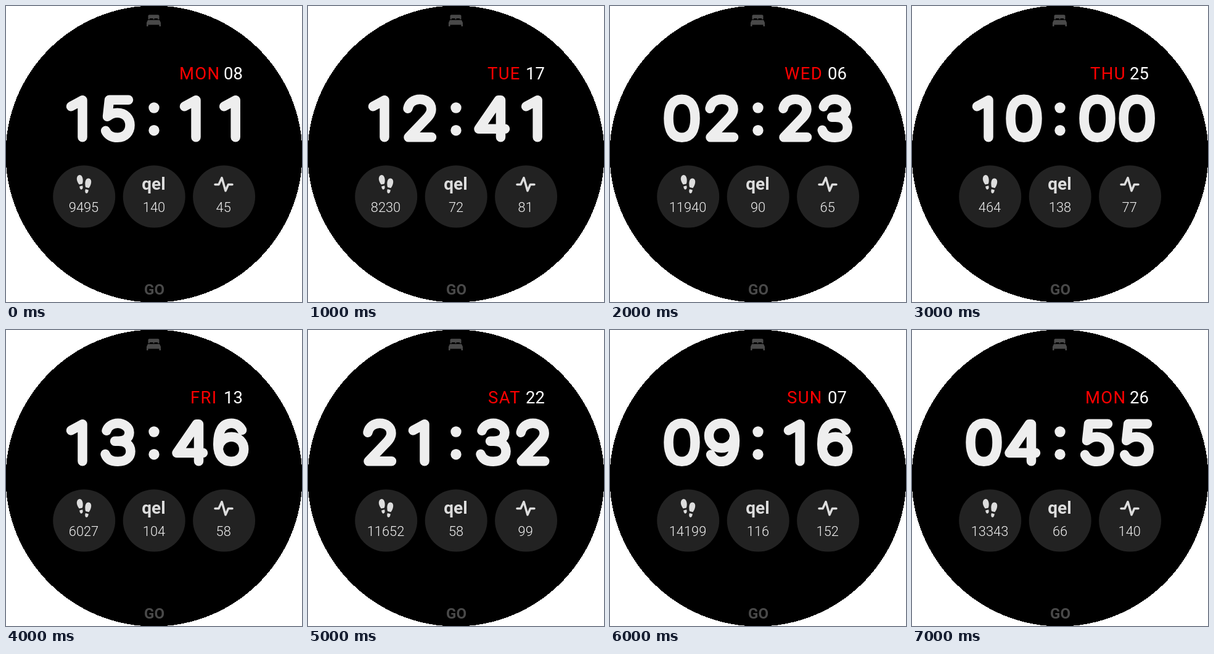
These frames come from a looping animation (480 px wide and 480 px high, 8 s). An HTML page:

```html
<!DOCTYPE html>
<html lang="en">
<head>
<meta charset="utf-8">
<title>Watch face</title>
<style>
  html, body { margin: 0; width: 100%; height: 100%; overflow: hidden; background: #fff; }
  svg { display: block; width: 480px; height: 480px; }
  text { font-family: Roboto, sans-serif; }
  .stat { font-size: 21.8px; font-weight: 350; fill: #f2f2f2; text-anchor: middle; }
  .date { font-size: 27.5px; font-weight: 400; fill: #fff; }
  #day { fill: #f00; letter-spacing: 1.3px; }
  #clock { fill: none; stroke: #eee; stroke-width: 15.5; stroke-linecap: round; stroke-linejoin: round; }
</style>
</head>
<body>
<svg viewBox="0 0 480 480">
  <circle cx="240" cy="240" r="240.6" shape-rendering="crispEdges"/>

  <g fill="#494949">
    <path d="M230.500 21.500V16Q230.500 14.300 232.500 14.300H246.500Q248.500 14.300 248.500 16V21.500H246V20H240.500V21.500H238.500V20H233V21.500Z"/>
    <path d="M230 22.700H249L251 27V33H248.500V30.500H230.500V33H228V27Z"/>
    <text x="240.5" y="468" font-size="24" font-weight="700" text-anchor="middle">GO</text>
  </g>

  <text id="day" class="date" y="118.5"></text>
  <text id="date" class="date" x="353" y="118.5"></text>

  <g id="clock"></g>
  <g fill="#eee"><circle cx="240" cy="165" r="8.7"/><circle cx="240" cy="201.7" r="8.7"/></g>

  <g fill="#222">
    <circle cx="126.7" cy="309" r="50.5"/>
    <circle cx="240.2" cy="309" r="50.5"/>
    <circle cx="353.6" cy="309" r="50.5"/>
  </g>

  <g fill="#ddd">
    <path d="M119 274C122.500 273.500 124.700 278 124.700 283Q124.700 286.500 123.700 288.500L118.600 289.600C116 286 114.800 283 114.800 280Q115 275 119 274Z"/>
    <path d="M119.200 292.500L124.200 291.300Q125.500 296.700 122.500 297.600Q119.700 298 119.200 292.500Z"/>
    <path d="M134 279.500C130 279 128.300 283.500 128.300 288Q128.300 292 129.300 294L134.400 295.200C136.800 292 138.400 288 138.200 284.500Q137.800 280 134 279.500Z"/>
    <path d="M133.800 298.200L128.800 297Q127.300 302.700 130 303.700Q133.200 304 133.800 298.200Z"/>
    <text x="239.5" y="298" font-size="28" font-weight="700" text-anchor="middle">qel</text>
  </g>
  <path d="M339 289.500H345L350 278.500L356 299.700L360.500 289.500H367" fill="none" stroke="#ddd"
        stroke-width="3.5" stroke-linecap="round" stroke-linejoin="round"/>

  <text id="steps" class="stat" x="126" y="334"></text>
  <text id="score" class="stat" x="240" y="334"></text>
  <text id="pulse" class="stat" x="352.7" y="334"></text>
</svg>
<script>
  // Centre lines of the big digits, relative to the middle of each cell.
  const six = 'M18-20C14-27 9-31 1-31C-14-31-21-19-21 3C-21 22-12 31 .5 31' +
              'S21 22 21 11S13-9 1-9S-20 0-20 9';
  const glyphs = {
    0: 'M0-31C15-31 21.500-19 21.500 0S15 31 0 31S-21.500 19-21.500 0S-15-31 0-31Z',
    1: 'M-11-19.500L7.500-29.500V30.500',
    2: 'M-19.500-16C-18-25-10-31 0-31S18.500-25 18.500-15C18.500-8 14-3 8 3L-18.500 30.500H19',
    3: 'M-18.500-19C-16-26-9-31 0-31S18.500-25 18.500-16S11-2 1-2H-5H1C12-2 20.500 4 20.500 14.500S12 31 0 31S-18 26-20.500 19',
    4: 'M12 30.500V-29.500H8.500L-23.500 17H19',
    5: 'M17-30H-14L-17-3C-12-7-7-9-1-9C12-9 19.500 0 19.500 11S12 31-.5 31C-10 31-17 27-20 20',
    6: six,
    9: six
  };
  const cells = [116.5, 181.5, 300.5, 364.7];
  const dayX = { MON: 281, TUE: 291, WED: 283, THU: 289, FRI: 299, SAT: 292, SUN: 287 };

  const faces = [
    ['MON', '08', '1511', '9495', '140', '45'],
    ['TUE', '17', '1241', '8230', '72', '81'],
    ['WED', '06', '0223', '11940', '90', '65'],
    ['THU', '25', '1000', '464', '138', '77'],
    ['FRI', '13', '1346', '6027', '104', '58'],
    ['SAT', '22', '2132', '11652', '58', '99'],
    ['SUN', '07', '0916', '14199', '116', '152'],
    ['MON', '26', '0455', '13343', '66', '140']
  ];
  const STEP = 1000;

  const byId = id => document.getElementById(id);
  const digits = cells.map(() =>
    byId('clock').appendChild(document.createElementNS('http://www.w3.org/2000/svg', 'path')));

  function show([day, date, time, steps, score, pulse]) {
    byId('day').setAttribute('x', dayX[day]);
    Object.entries({ day, date, steps, score, pulse })
      .forEach(([id, value]) => { byId(id).textContent = value; });
    digits.forEach((path, i) => {
      const turn = time[i] === '9' ? ' rotate(180)' : '';
      path.setAttribute('d', glyphs[time[i]]);
      path.setAttribute('transform', `translate(${cells[i]} 182.3)${turn}`);
    });
  }

  let current = -1;
  function tick() {
    const next = Math.floor(performance.now() / STEP) % faces.length;
    if (next !== current) show(faces[current = next]);
    requestAnimationFrame(tick);
  }
  tick();
</script>
</body>
</html>
```
